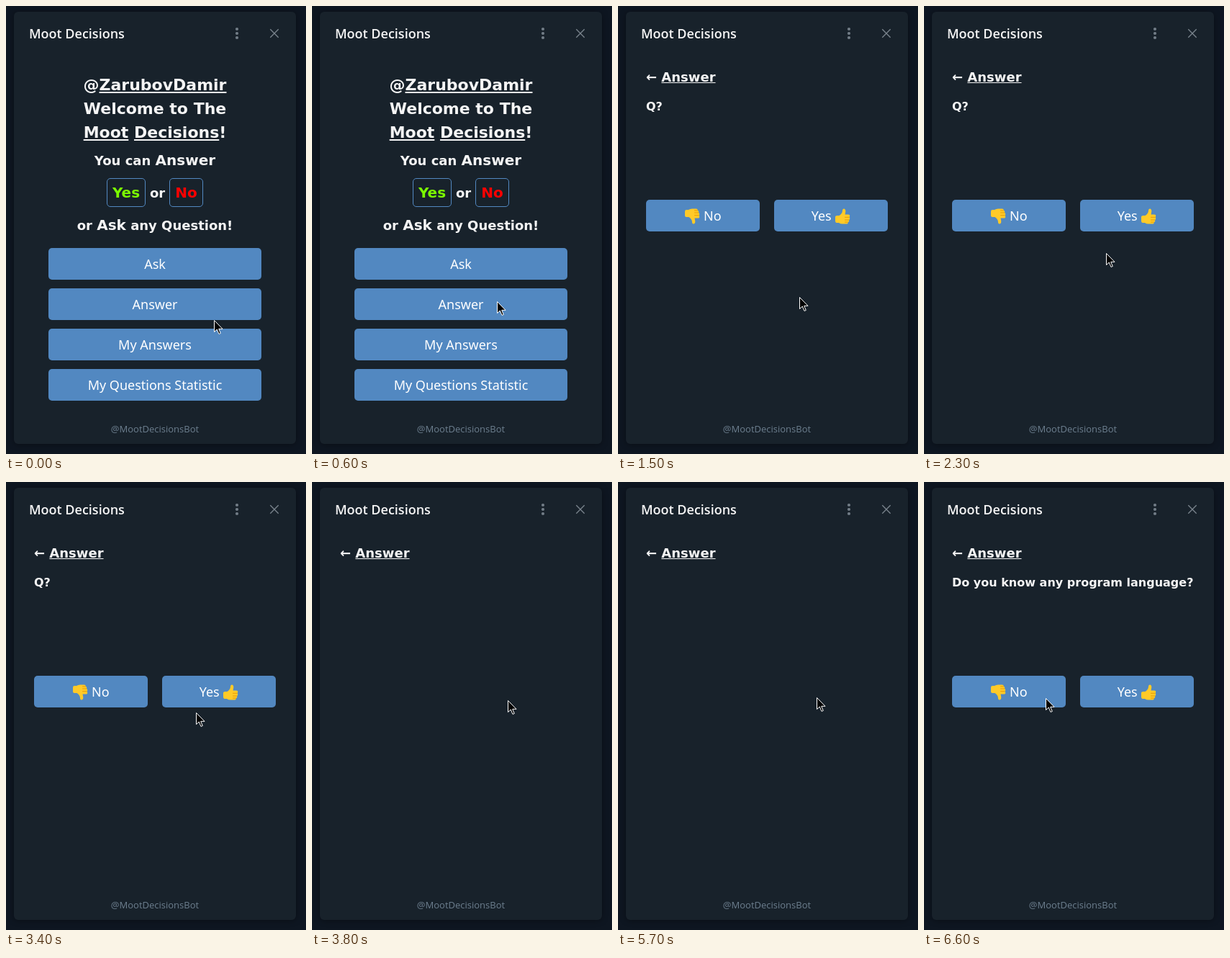
An HTML page for the animation above (8000 ms loop, 417 by 622 pixels).

```html
<!DOCTYPE html>
<html lang="en">
<head>
<meta charset="utf-8">
<title>Moot Decisions</title>
<style>
html, body { margin: 0; width: 100%; height: 100%; overflow: hidden; background: #0e1621; }
body { position: relative; color: #f5f5f5; font: 700 18px/27px 'DejaVu Sans', sans-serif; }
body div, body > svg { position: absolute; white-space: nowrap; }
.card {
  left: 11px; top: 8px; width: 392px; height: 600px;
  border-radius: 6px; background: #18222b; box-shadow: 0 1px 8px rgba(0, 0, 0, .35);
}
.bar { left: 32px; top: 24px; font: 600 18px/28px 'Open Sans', sans-serif; }
.row { left: 11px; width: 392px; text-align: center; }
.foot { top: 578px; font: 13px/18px 'Open Sans', sans-serif; color: #6d7f8f; }
.h1 { font-size: 22px; line-height: 33px; }
.big { font-size: 20px; line-height: 0; }
.q { left: 39px; top: 127px; font-size: 16px; line-height: 25px; }
.tag {
  top: 239px; height: 40px; box-sizing: border-box; border: 1px solid #5288c1; border-radius: 5px;
  font-size: 20px; line-height: 38px; text-align: center;
}
.btn {
  left: 59px; width: 296px; height: 44px; border-radius: 5px; background: #5288c1; color: #fff;
  font: 18px/44px 'Noto Sans', sans-serif; text-align: center;
}
.vote .btn { top: 269px; width: 158px; }
.thumb { width: 22px; height: 22px; vertical-align: -5px; }
.down { transform: scaleY(-1); }

/* A slight lead keeps the steps clear of the 100 ms ticks. */
.menu, .answer, .vote, .q, .cursor { animation: 8s step-end -10ms infinite; }
.menu { animation-name: menu; }
.answer { animation-name: answer; }
.vote { animation-name: vote; }
.q1 { animation-name: q1; }
.q2 { animation-name: q2; }
.q3 { animation-name: q3; }
.cursor { animation-name: move; }

@keyframes menu { 0% { visibility: visible } 8.75%, 100% { visibility: hidden } }
@keyframes answer { 0% { visibility: hidden } 8.75%, 100% { visibility: visible } }
@keyframes vote {
  0%, 47.5%, 71.25% { visibility: hidden }
  18.75%, 52.5%, 76.25%, 100% { visibility: visible }
}
@keyframes q1 { 0%, 47.5%, 100% { visibility: hidden } 18.75% { visibility: visible } }
@keyframes q2 { 0%, 71.25%, 100% { visibility: hidden } 52.5% { visibility: visible } }
@keyframes q3 { 0% { visibility: hidden } 76.25%, 100% { visibility: visible } }
@keyframes move {
  0% { left: 289px; top: 436px }
  2.5% { left: 289px; top: 436px; animation-timing-function: steps(3, start) }
  6.25% { left: 258px; top: 410px }
  7.5% { left: 257px; top: 410px }
  15% { left: 252px; top: 395px }
  18.75% { left: 252px; top: 406px; animation-timing-function: steps(3, start) }
  22.5% { left: 253px; top: 399px }
  23.75% { left: 253px; top: 399px; animation-timing-function: steps(3, start) }
  27.5% { left: 251px; top: 365px; animation-timing-function: steps(2, start) }
  30% { left: 253px; top: 343px }
  38.75% { left: 253px; top: 343px; animation-timing-function: steps(7, start) }
  47.5% { left: 272px; top: 303px }
  60% { left: 272px; top: 303px; animation-timing-function: steps(3, start) }
  63.75% { left: 276px; top: 299px }
  72.5% { left: 276px; top: 299px; animation-timing-function: steps(2, start) }
  75% { left: 266px; top: 309px }
  81.25% { left: 266px; top: 309px; animation-timing-function: steps(2, start) }
  83.75%, 100% { left: 169px; top: 300px }
}
</style>
</head>
<body>
<div class="card"></div>
<svg width="417" height="70">
  <defs>
    <g id="thumb">
      <path fill="#ffca28" d="M1 12Q1 10 4 10H6.500Q11 7 11 3Q11 0 13.500.5Q16 1.500 15 6L14.500 8.500H19Q21.500 8.500 21.200 10.500Q21 12 20.500 12.300Q21.800 13.200 21 15Q20.600 16 20 16.100Q20.800 17.300 19.800 18.600Q19.300 19.200 18.600 19.200Q19 21.500 16.500 21.500H11Q8 21.500 6 20H3Q1 20 1 17Z"/>
      <path fill="none" stroke="#e59600" stroke-width=".9" stroke-linecap="round" d="M14.500 12.300H20M14.500 16H19.600M14.500 19.100H18.300"/>
    </g>
  </defs>
  <g fill="#727d87">
    <circle cx="321" cy="32" r="2.100"/>
    <circle cx="321" cy="38" r="2.100"/>
    <circle cx="321" cy="44" r="2.100"/>
  </g>
  <path d="M367.300 32.300l11.400 11.400m0-11.400l-11.400 11.400" stroke="#7b858e" stroke-width="1.300"/>
</svg>
<div class="bar">Moot Decisions</div>
<div class="row foot">@MootDecisionsBot</div>

<div class="menu">
  <div class="row h1" style="top:93px">@<u>ZarubovDamir</u></div>
  <div class="row h1" style="top:126px">Welcome to The</div>
  <div class="row h1" style="top:159px"><u>Moot</u> <u>Decisions</u>!</div>
  <div class="row" style="top:201px">You can <span class="big">Answer</span></div>
  <div class="tag" style="left:140px;width:54px;color:#7cfc00">Yes</div>
  <div style="left:200px;top:246px">or</div>
  <div class="tag" style="left:227px;width:47px;color:#f00">No</div>
  <div class="row" style="top:291px">or <span class="big">Ask</span> any Question!</div>
  <div class="btn" style="top:336px">Ask</div>
  <div class="btn" style="top:392px">Answer</div>
  <div class="btn" style="top:448px">My Answers</div>
  <div class="btn" style="top:504px">My Questions Statistic</div>
</div>

<div class="answer" style="left:39px;top:85px">← <u>Answer</u></div>
<div class="q q1">Q?</div>
<div class="q q2">Speak - silver, silence - gold.</div>
<div class="q q3">Do you know any program language?</div>
<div class="vote">
  <div class="btn" style="left:39px"><svg class="thumb down"><use href="#thumb"/></svg> No</div>
  <div class="btn" style="left:217px">Yes <svg class="thumb"><use href="#thumb"/></svg></div>
</div>

<svg class="cursor" width="14" height="21">
  <path d="M.5.5V16.500L4.300 13 7 19.400 9.300 18.400 6.700 12.300H12Z" stroke="#fff" stroke-linejoin="round"/>
</svg>
</body>
</html>
```
